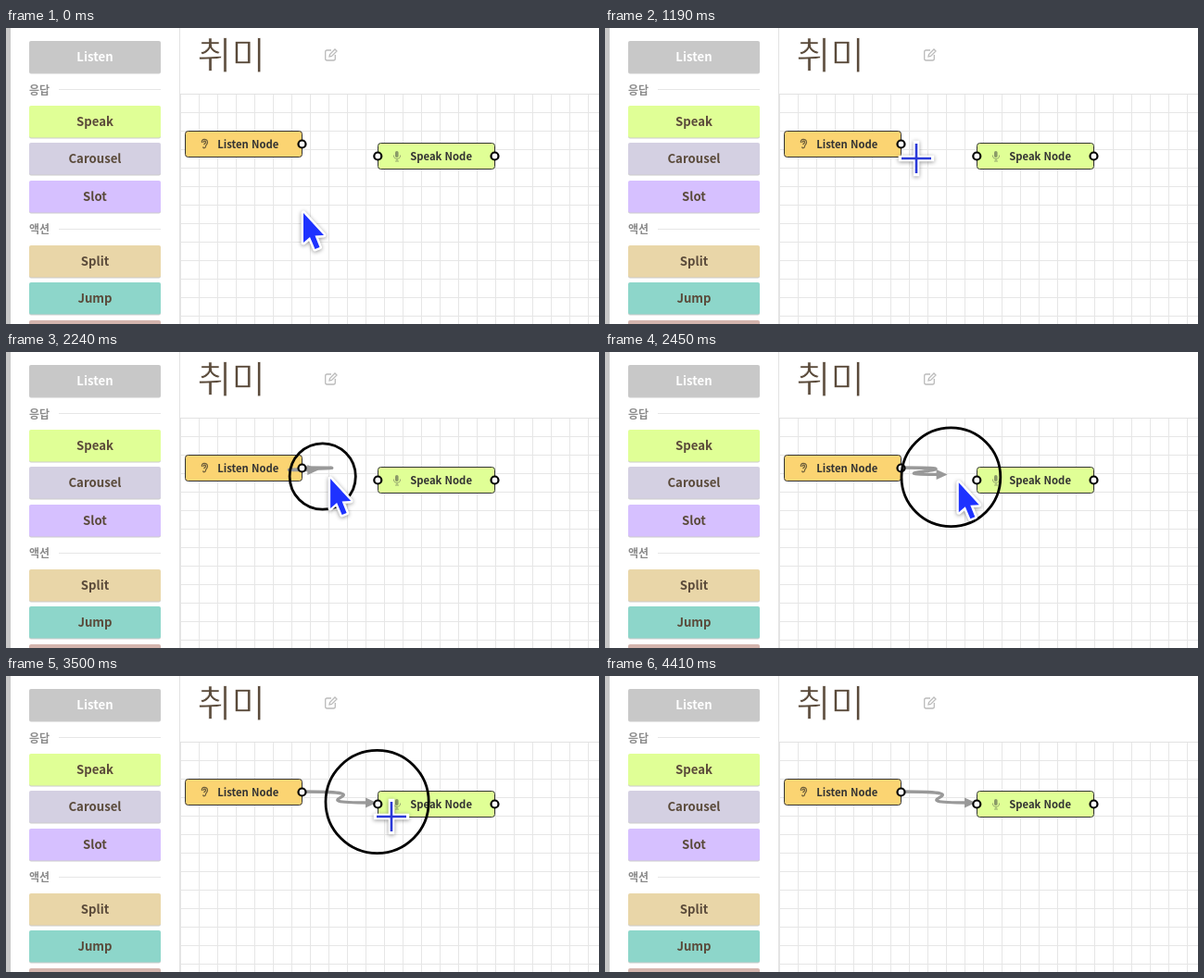
These frames come from a looping animation (640 by 320 pixels, 4.97 s). An HTML page:

```html
<!DOCTYPE html>
<html lang="ko">
<head>
<meta charset="utf-8">
<style>
html, body { margin: 0; width: 100%; height: 100%; overflow: hidden; background: #fff; }
svg { display: block; width: 640px; height: 320px; font-family: "Noto Sans CJK KR", "Noto Sans CJK", "Noto Sans", sans-serif; }
.button { font-size: 13.2px; font-weight: 700; text-anchor: middle; }
.node { font-size: 11.3px; font-weight: 700; fill: #333; }
.group { font-size: 12px; font-weight: 700; fill: #8a8a8a; }
.title { font-size: 40px; font-weight: 300; fill: #5a4a3a; stroke: #fff; stroke-width: .7px; }
.port { fill: #fff; stroke: #000; stroke-width: 2.2; }
.box { stroke: #333; }
.raised { filter: drop-shadow(0 1px .7px #0003); }
#cursor { filter: drop-shadow(0 1.5px 2px #0006); }
</style>
</head>
<body>
<svg viewBox="0 0 640 320">
  <defs>
    <pattern id="grid" x="188" y="71" width="20" height="20" patternUnits="userSpaceOnUse">
      <path d="M.5 0V20M0 .5H20" stroke="#e6e6e6"/>
    </pattern>
    <path id="arrow" d="M1 2v32l7 -6l5.500 13l5 -2l-5 -12.500l9.500 -.5Z"/>
    <path id="cross" d="M-8 9H24M8 -7V25"/>
  </defs>
  <rect x="188" y="71" width="452" height="249" fill="url(#grid)"/>
  <path d="M187.500 0V320M188 71.500H640" stroke="#e2e2e2"/>
  <rect width="5" height="320" fill="#c8c8c8"/>
  <g id="palette"></g>
  <text class="group" x="25" y="71.500">응답</text>
  <text class="group" x="25" y="221.500">액션</text>
  <path d="M57 66.500H167M57 217.500H167" stroke="#e6e6e6"/>

  <text class="title" x="206.500" y="44">취미</text>
  <g fill="none" stroke="#bbb" stroke-width="1.300">
    <path d="M351 24H346.500Q344.700 24 344.700 26V33Q344.700 35 346.500 35H353.500Q355.300 35 355.300 33V29"/>
    <path d="M349 31L349.500 28.500L355 23L357 25L351.500 30.500Z"/>
  </g>

  <g id="nodes"></g>
  <path d="M211.500 124C210 119.500 217.500 119 217.500 123.500C217.500 126 215.500 126 215.500 128C215.500 130 213 130.500 212.500 128.500M213 124C213 121.500 216 121.500 215.500 124L213.500 126" fill="none" stroke="#6b5c3a" stroke-width="1.200"/>
  <rect x="420" y="133" width="3.600" height="7" rx="1.800" fill="#8a9a68"/>
  <path d="M418.500 137.500V139Q419 141.500 422 141.500T425.500 139V137.500M422 141.500V144M420 144H424" fill="none" stroke="#8a9a68" stroke-width=".8"/>

  <g id="wire" fill="#999">
    <path id="curve" fill="none" stroke="#999" stroke-width="3.300"/>
    <path id="head"/>
  </g>
  <circle class="port" cx="319.500" cy="125.500" r="4"/>
  <circle class="port" cx="401.300" cy="138.500" r="4"/>
  <circle class="port" cx="527.500" cy="138.500" r="4"/>

  <circle id="ring" fill="none" stroke="#000" stroke-width="2.800"/>
  <g id="cursor">
    <g id="pointer" stroke-linejoin="round">
      <use href="#arrow" fill="#fff" stroke="#fff" stroke-width="5"/>
      <use href="#arrow" fill="#1e32ff"/>
    </g>
    <g id="plus" fill="none">
      <use href="#cross" stroke="#fff" stroke-width="6.500" stroke-linecap="square"/>
      <use href="#cross" stroke="#2a3ad8" stroke-width="2.600"/>
    </g>
  </g>
</svg>
<script>
const LOOP = 4970, STEP = 70, ROW = 40.5;
const $ = id => document.getElementById(id);

const button = (label, y, fill, ink = "#5a4a3a") =>
  `<rect class="raised" x="25" y="${y}" width="142" height="34.5" rx="2" fill="${fill}"/>
   <text class="button" x="96" y="${y + 22}" fill="${ink}">${label}</text>`;
const column = (top, items) =>
  items.map(([label, fill, ink], i) => button(label, Math.floor(top + i * ROW), fill, ink)).join("");
$("palette").innerHTML =
  column(14, [["Listen", "#c8c8c8", "#fff"]]) +
  column(84, [["Speak", "#e0ff96"], ["Carousel", "#d4d0e2"], ["Slot", "#d6c0ff"]]) +
  column(235, [["Split", "#e9d6a8"], ["Jump", "#8dd6ca"], ["", "#d4b5ae"]]);

const node = (label, x, y, fill) =>
  `<rect class="box" x="${x}" y="${y}" width="126" height="28" rx="3" fill="${fill}"/>
   <text class="node" x="${x + 34.7}" y="${y + 18}">${label}</text>`;
$("nodes").innerHTML =
  node("Listen Node", 193.5, 111.5, "#fbd472") + node("Speak Node", 401.5, 124.5, "#e0ff96");

const ramp = (t, from, to) => Math.min(1, Math.max(0, (t - from) / (to - from)));
const easeOut = p => 1 - (1 - p) ** 2;
const show = (id, on) => $(id).setAttribute("visibility", on ? "visible" : "hidden");
const set = (id, values) => {
  for (const name in values) $(id).setAttribute(name, values[name]);
};

function draw(now) {
  const t = Math.floor(now % LOOP / STEP) * STEP;

  // The pointer rises to the first port, drags quickly then slowly, and leaves downwards.
  const approach = ramp(t, 0, 280), settle = ramp(t, 560, 1050);
  const drag = 0.66 * ramp(t, 2100, 2450) + 0.34 * ramp(t, 2450, 2940);
  const leave = easeOut(ramp(t, 3640, 4410));
  const dragX = 320 + 8 * approach + 80 * drag;
  const y = 198 - 40 * approach - 26 * settle + 11 * drag + 170 * leave;
  set("cursor", { transform: `translate(${dragX - 75 * leave} ${y})` });
  const crossing = (t >= 1190 && t < 2100) || (t >= 3150 && t < 3710);
  show("plus", crossing);
  show("pointer", !crossing && t < 4410);

  const pull = drag ** 1.15, endX = 320 + 80 * pull, endY = 125 + 12 * pull;
  set("curve", { d: `M320 125C420 125 ${endX - 93} ${endY} ${endX - 8} ${endY}` });
  set("head", { d: `M${endX} ${endY}l-12 -5.5v11Z` });
  show("wire", drag > 0);

  const size = ramp(t, 2100, 2310) - ramp(t, 3640, 3850);
  const r = size * (53.4 + 2.2 * ramp(t, 2800, 2940));
  set("ring", { cx: dragX - 7.4, cy: 134 + 2 * drag, r });
  show("ring", r > 0);
  requestAnimationFrame(draw);
}
requestAnimationFrame(draw);
</script>
</body>
</html>
```
